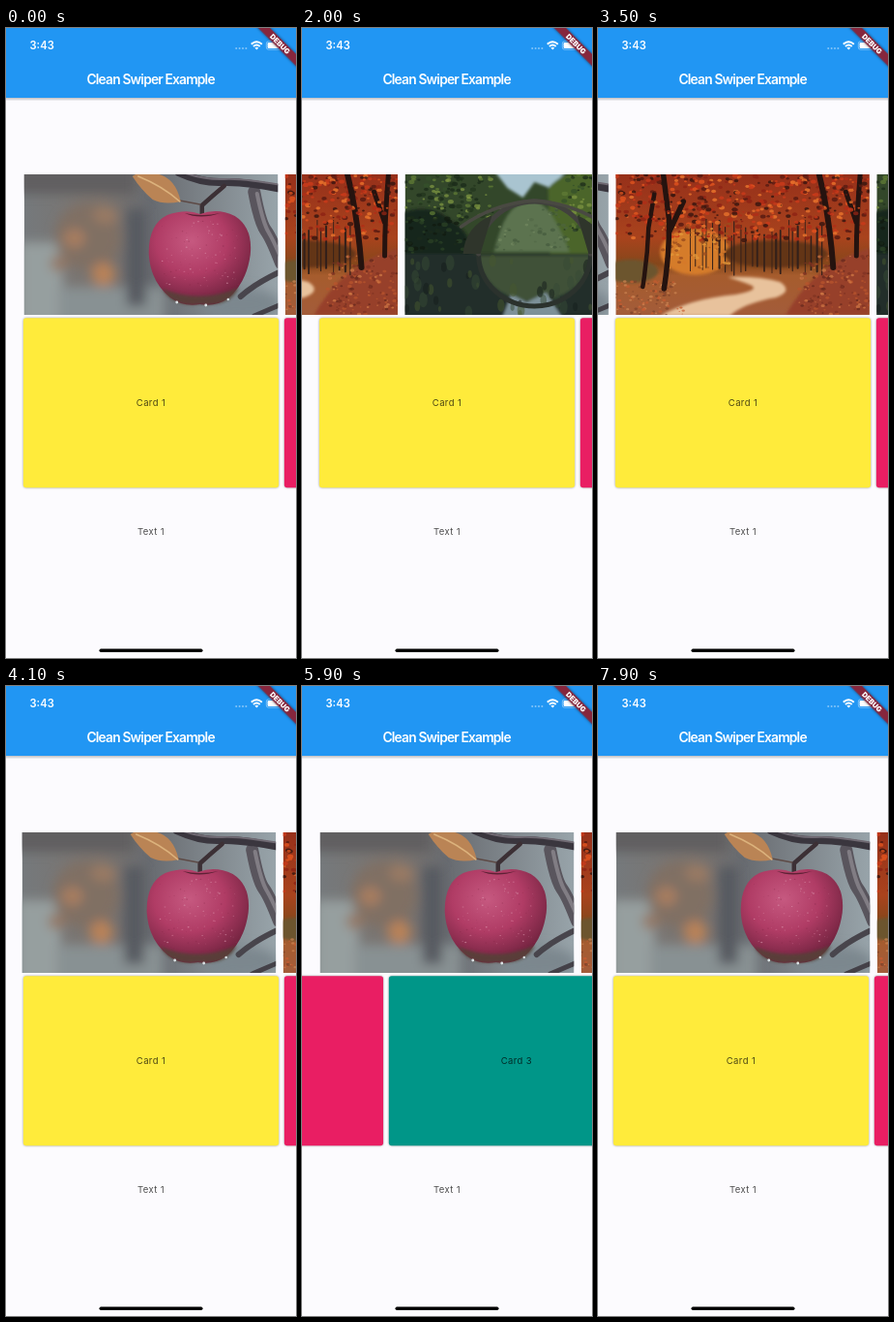
Write an HTML page that moves like this. It is 300 px wide and 650 px high and loops after 8000 ms.

```html
<!DOCTYPE html>
<html lang="en">
<head>
<meta charset="utf-8">
<title>Clean Swiper Example</title>
<style>
  html, body { margin: 0; width: 100%; height: 100%; overflow: hidden; background: #fcfbfe; }
  #stage { display: block; width: 100vw; height: 100vh; font-family: Inter, Roboto, sans-serif; }
  .label { font-size: 9.5px; letter-spacing: .38px; text-anchor: middle; fill: #000; fill-opacity: .7; }
  .card { filter: drop-shadow(0 .8px .8px rgba(0, 0, 0, .38)); }
  .ribbon { filter: drop-shadow(0 0 1.6px rgba(0, 0, 0, .5)); }
  .wood { fill: none; stroke-linecap: round; stroke-linejoin: round; }
</style>
</head>
<body>
<svg id="stage" viewBox="0 0 300 650">
  <defs>
    <filter id="soft" x="-50%" y="-50%" width="200%" height="200%"><feGaussianBlur stdDeviation="6"/></filter>
    <filter id="hazy" x="-20%" y="-20%" width="140%" height="140%"><feGaussianBlur stdDeviation="1.8"/></filter>
    <linearGradient id="mist">
      <stop offset="0" stop-color="#75797c"/><stop offset=".3" stop-color="#7b736d"/>
      <stop offset=".5" stop-color="#686b70"/><stop offset="1" stop-color="#98a4aa"/>
    </linearGradient>
    <radialGradient id="skin" cx=".42" cy=".32" r=".7">
      <stop offset="0" stop-color="#c65980"/><stop offset=".5" stop-color="#b03c65"/>
      <stop offset="1" stop-color="#6c213c"/>
    </radialGradient>
    <linearGradient id="autumn" x2="0" y2="1">
      <stop offset="0" stop-color="#96301a"/><stop offset=".45" stop-color="#a9431d"/>
      <stop offset=".64" stop-color="#85471b"/><stop offset=".72" stop-color="#a65c2d"/>
      <stop offset="1" stop-color="#a35c3a"/>
    </linearGradient>
    <linearGradient id="drop" x2="0" y2="1">
      <stop offset="0" stop-color="#000" stop-opacity=".24"/><stop offset="1" stop-color="#000" stop-opacity="0"/>
    </linearGradient>
  </defs>

  <rect width="300" height="650" fill="#fcfbfe"/>

  <g id="pics">
    <svg x="18.75" y="151" width="262.5" height="145">
      <rect width="263" height="145" fill="url(#mist)"/>
      <g filter="url(#soft)">
        <rect x="-10" y="-10" width="125" height="30" fill="#605f60"/>
        <rect x="-5" y="70" width="45" height="90" fill="#969f9f"/>
        <rect x="36" y="116" width="110" height="40" fill="#889193"/>
        <rect x="106" y="36" width="20" height="100" fill="#565a61"/>
        <ellipse cx="66" cy="64" rx="34" ry="34" fill="#806f64"/>
        <ellipse cx="52" cy="66" rx="11" ry="10" fill="#a87e60"/>
        <ellipse cx="82" cy="103" rx="12" ry="12" fill="#b98258"/>
        <ellipse cx="84" cy="42" rx="13" ry="9" fill="#9a7a64"/>
        <ellipse cx="36" cy="92" rx="9" ry="8" fill="#947865"/>
        <ellipse cx="226" cy="134" rx="40" ry="16" fill="#7b878e"/>
      </g>
      <g class="wood">
        <path d="M238 18Q244 50 250 58T266 92" stroke="#59555d" stroke-width="13"/>
        <path d="M241 20Q247 50 253 60T268 92" stroke="#817d84" stroke-width="4"/>
        <path d="M224 126Q240 112 266 100" stroke="#48454c" stroke-width="6"/>
        <path d="M238 146L266 134" stroke="#444148" stroke-width="5"/>
        <path d="M160 -2Q184 9 205 8T266 15" stroke="#3a363e" stroke-width="8"/>
        <path d="M164 -2Q188 6 207 5T266 11" stroke="#706a73" stroke-width="2"/>
        <path d="M207 12Q195 22 184 32V42" stroke="#3c3035" stroke-width="4.5"/>
        <path d="M161 27L182 31" stroke="#5d4a46" stroke-width="1.5"/>
      </g>
      <path d="M112 2Q118 -3 134 -1Q156 1 162 28Q145 32 133 26Q121 16 112 2Z" fill="#ba8455"/>
      <path d="M118 2Q143 12 161 28" class="wood" stroke="#dcb27c" stroke-width="1.5"/>
      <path d="M182 41Q200 34 218 43Q237 55 234 83Q230 112 211 128Q198 137 182 134Q164 137 151 127Q131 111 129 83Q128 52 148 42Q168 35 182 41Z" fill="url(#skin)"/>
      <path d="M143 118Q181 134 222 117Q213 137 182 134Q153 137 143 118Z" fill="#544239" opacity=".85" filter="url(#hazy)"/>
      <path d="M166 40Q182 47 203 40Q184 44 166 40Z" fill="#5e2135"/>
      <g id="dew"></g>
      <g fill="#dce3e5"><circle cx="158" cy="132" r="1.4"/><circle cx="188" cy="135" r="1.4"/><circle cx="211" cy="129" r="1.2"/></g>
    </svg>

    <svg x="288.75" y="151" width="262.5" height="145">
      <rect width="263" height="145" fill="url(#autumn)"/>
      <g filter="url(#hazy)">
        <ellipse cx="82" cy="80" rx="36" ry="24" fill="#d57c2a"/>
        <ellipse cx="165" cy="82" rx="54" ry="14" fill="#633619"/>
        <ellipse cx="16" cy="100" rx="28" ry="12" fill="#6c552f"/>
        <path d="M176 145Q205 92 263 76V145Z" fill="#97402a"/>
        <path d="M46 146Q78 128 124 124Q151 119 139 114Q126 109 116 106Q150 105 170 111Q184 120 166 127Q132 133 118 146Z" fill="#e8c29c"/>
      </g>
      <g id="trunks" class="wood" stroke="#33201a"></g>
      <g id="leaves"></g>
      <g class="wood" stroke="#25130f">
        <path d="M28 116Q33 85 34 55L40 20" stroke-width="4.5"/>
        <path d="M50 118Q56 80 55 45L49 -2M55 60L70 28" stroke-width="5.5"/>
        <path d="M225 96Q222 55 215 20L210 -2" stroke-width="6"/>
        <path d="M249 84Q249 45 253 -2M249 50L238 18" stroke-width="5"/>
      </g>
      <g id="topLeaves"></g>
    </svg>

    <svg x="558.75" y="151" width="262.5" height="145">
      <rect width="263" height="145" fill="#33472a"/>
      <g filter="url(#hazy)">
        <path d="M92 -4H168L150 14L134 8L122 24L106 14Z" fill="#a9c4d0"/>
        <path d="M148 14Q165 -5 196 -5H268V82H150Z" fill="#4b6529"/>
        <path d="M92 80Q104 30 124 30Q146 16 170 80Z" fill="#5c7350"/>
        <path d="M-5 40Q28 28 48 48Q64 55 72 82H-5Z" fill="#17251a"/>
        <path d="M196 82Q210 48 268 38V82Z" fill="#1f2e19"/>
        <path d="M-5 82H268V150H-5Z" fill="#222f2a"/>
        <path d="M76 84H192Q186 126 134 132Q82 126 76 84Z" fill="#3f5138"/>
        <path d="M100 150L110 124L126 132L146 122L164 150Z" fill="#7d9199"/>
      </g>
      <g id="bush"></g>
      <g id="ripples"></g>
      <g class="wood">
        <path d="M76 82A58 54 0 0 0 192 82" stroke="#2b322d" stroke-width="5"/>
        <path d="M76 82A58 54 0 0 1 192 82" stroke="#41413d" stroke-width="5"/>
        <path d="M58 54Q92 30 134 27Q176 30 210 54" stroke="#494942" stroke-width="3.5"/>
      </g>
      <path d="M60 82Q62 54 90 42L78 82Z" fill="#2f352b"/>
      <path d="M208 82Q206 54 178 42L190 82Z" fill="#2f352b"/>
    </svg>
  </g>

  <g id="cards"></g>
  <text class="label" x="150" y="523.2">Text 1</text>

  <rect y="72" width="300" height="3.5" fill="url(#drop)"/>
  <rect width="300" height="72" fill="#2196f3"/>
  <text x="149.6" y="57.6" text-anchor="middle" font-size="13.8" font-weight="600" letter-spacing="-.82" fill="#fff">Clean Swiper Example</text>
  <text x="24.5" y="22.4" font-size="11.2" font-weight="600" fill="#fff">3:43</text>
  <g fill="#fff" fill-opacity=".45">
    <circle cx="238.2" cy="21" r="1"/><circle cx="241.6" cy="21" r="1"/><circle cx="245" cy="21" r="1"/><circle cx="248.4" cy="21" r="1"/>
  </g>
  <path d="M253.8 16.8Q259.3 11.8 264.8 16.8M255.9 19Q259.3 16 262.7 19" fill="none" stroke="#fff" stroke-width="1.9"/>
  <path d="M257.4 20.6Q259.3 19 261.2 20.6L259.3 22.6Z" fill="#fff"/>
  <rect x="269.3" y="13.8" width="17" height="8.4" rx="2.3" fill="none" stroke="#fff" stroke-opacity=".5" stroke-width=".8"/>
  <rect x="270.6" y="15.1" width="14.4" height="5.8" rx="1.2" fill="#fff"/>
  <g transform="translate(300 0) rotate(45)">
    <rect class="ribbon" x="-30" y="18.9" width="60" height="8.7" fill="#86263d"/>
    <text y="26" text-anchor="middle" font-size="7.4" font-weight="900" fill="#fff">DEBUG</text>
  </g>
  <rect x="96.5" y="640.6" width="107" height="3.4" rx="1.7" fill="#000"/>
</svg>

<script>
const LOOP = 8000, STEP = 100, PITCH = 270, DRAG = 0.1;
const $ = id => document.getElementById(id);

function add(parent, tag, attrs) {
  const el = document.createElementNS('http://www.w3.org/2000/svg', tag);
  for (const key in attrs) el.setAttribute(key, attrs[key]);
  return parent.appendChild(el);
}

let seed = 17;
const rnd = () => (seed = (seed * 16807) % 2147483647) / 2147483647;

function specks(id, count, [x, y, w, h], size, colors, opacity = 1, flat = 0.7) {
  for (let i = 0; i < count; i++) {
    const r = size * (0.5 + rnd());
    add($(id), 'ellipse', {
      cx: (x + rnd() * w).toFixed(1), cy: (y + rnd() * h).toFixed(1),
      rx: r.toFixed(2), ry: (r * flat).toFixed(2),
      fill: colors[Math.floor(rnd() * colors.length)], opacity
    });
  }
}

const reds = ['#8f2415', '#c93a1b', '#e0531f', '#b22e17', '#e8722c', '#5a1c12', '#3a1710'];
const greens = ['#34502a', '#5f7b34', '#7d9440', '#22351d', '#1a2a18'];

specks('dew', 110, [142, 48, 80, 68], 0.7, ['#e6a9bd', '#d57a99', '#8b2b4c'], 0.5);

for (let i = 0; i < 24; i++) {
  const x = 74 + i * 6 + rnd() * 4;
  add($('trunks'), 'path', { d: `M${x} ${94 + rnd() * 10}V${45 + rnd() * 20}`, 'stroke-width': 0.7 + rnd() * 1.5 });
}
specks('leaves', 420, [0, 0, 263, 68], 2.1, reds, 0.85);
specks('leaves', 90, [48, 50, 70, 48], 1.8, ['#e4983a', '#d8792a', '#9c4d1d'], 0.8);
specks('leaves', 150, [190, 84, 73, 61], 1.6, ['#66281c', '#b9542d', '#cf7745', '#7f3222'], 0.75);
specks('leaves', 110, [0, 110, 70, 35], 1.4, ['#7c422a', '#cf8753', '#c65c31'], 0.7);
specks('topLeaves', 150, [0, 0, 263, 46], 2, reds, 0.8);

specks('bush', 130, [0, 0, 94, 48], 2.2, greens, 0.75);
specks('bush', 150, [162, 0, 101, 58], 2.2, greens, 0.75);
specks('bush', 60, [0, 44, 64, 38], 2.2, ['#10190f', '#2c4426', '#1a2a1c'], 0.7);
specks('bush', 60, [92, 32, 84, 48], 1.8, ['#4e6545', '#7a8f66', '#3b5136'], 0.5);
specks('ripples', 60, [0, 86, 263, 58], 3, ['#46582f', '#141d1b', '#364a35'], 0.5, 1.8);

['#ffeb3b', '#e91e63', '#009688'].forEach((fill, i) => {
  const x = 17.9 + i * PITCH;
  add($('cards'), 'rect', { class: 'card', x, y: 299.2, width: 264.2, height: 175, rx: 2.9, fill });
  add($('cards'), 'text', { class: 'label', x: x + 132.1, y: 390.2 }).textContent = `Card ${i + 1}`;
});

// Each swipe: release time, drag length, direction, weight of the slow spring mode.
const swipes = {
  pics: [[541, 100, 1, 1.24], [1868, 100, 1, 1.24], [2780, 100, -1, 1.24], [3565, 60, -1, 1.1]],
  cards: [[4770, 60, 1, 0.95], [5745, 100, 1, 1.24], [6722, 100, -1, 1.24], [7440, 40, -1, 0.54]]
};

// A linear finger drag, then an overdamped spring to the next page.
function progress(t, [release, drag, , slow]) {
  const u = (t - release) / 1000;
  if (u < 0) return DRAG * Math.max(0, 1 + u * 1000 / drag);
  const left = (1 - DRAG) * (slow * Math.exp(-9.07 * u) + (1 - slow) * Math.exp(-22 * u));
  return left < 0.001 ? 1 : 1 - left;
}

const start = performance.now();
function draw() {
  const now = Math.max(0, performance.now() - start) % LOOP;
  const t = Math.floor(now / STEP) * STEP;
  for (const id in swipes) {
    const page = swipes[id].reduce((sum, s) => sum + s[2] * progress(t, s), 0);
    $(id).setAttribute('transform', `translate(${(-page * PITCH).toFixed(2)} 0)`);
  }
  requestAnimationFrame(draw);
}
draw();
</script>
</body>
</html>
```
